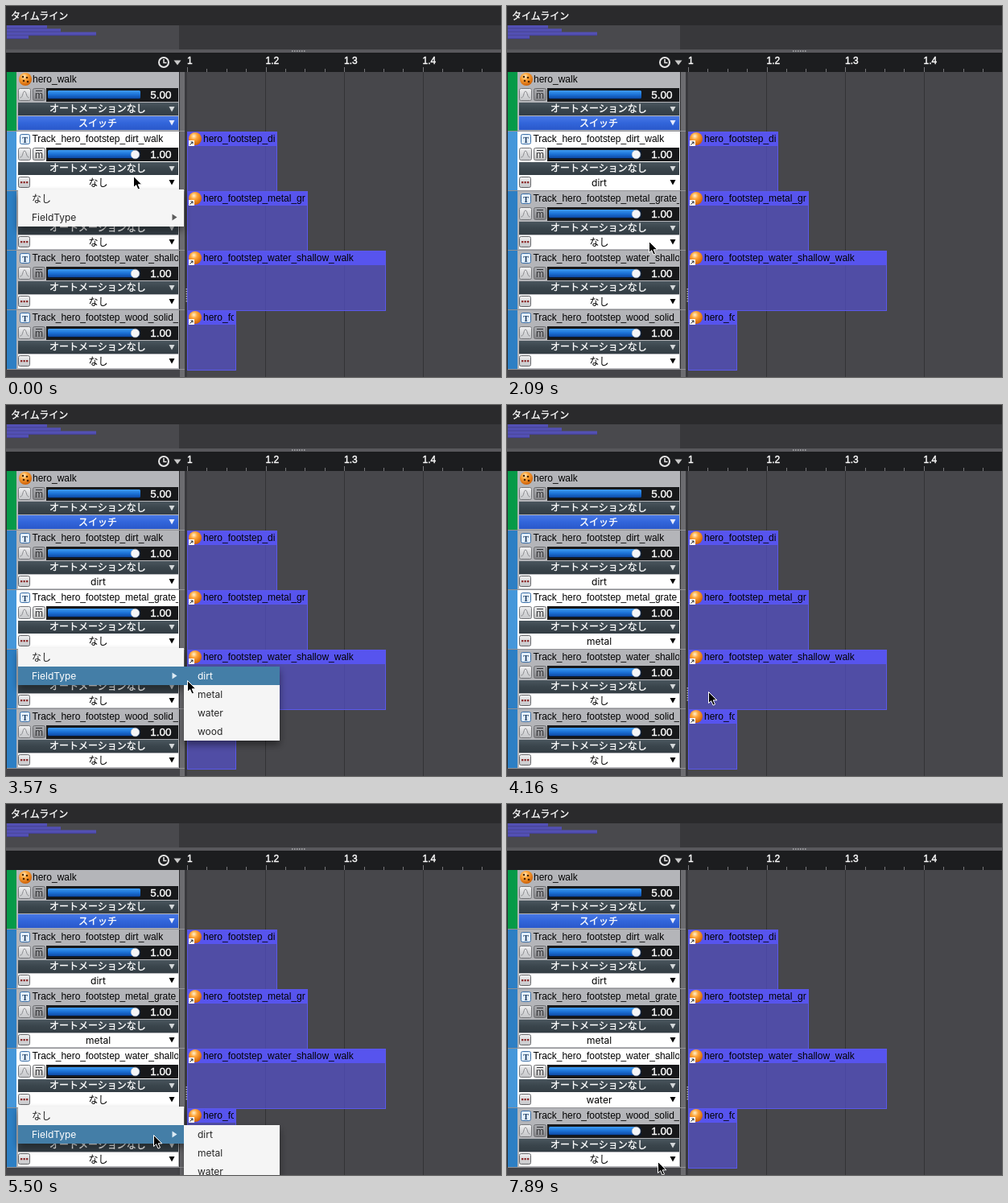
Write an HTML page that moves like this. It is 615 px wide and 461 px high and loops after 8000 ms.

```html
<!DOCTYPE html>
<html lang="ja">
<head>
<meta charset="utf-8">
<title>Timeline</title>
<style>
html, body { margin: 0; width: 100%; height: 100%; overflow: hidden; background: #47474b; }
svg { display: block; width: 100vw; height: 100vh; }
text { font: 12px "Liberation Sans", Arial, sans-serif; white-space: pre; }
.jp { font-family: "Noto Sans CJK JP", "Noto Sans CJK", sans-serif; stroke: #fff; stroke-width: .35px; }
.ui { font-family: Inter, "Noto Sans CJK JP", "Noto Sans CJK", sans-serif; }
.mid { text-anchor: middle; }
.name { letter-spacing: -.03px; }
.num { font-size: 13.5px; text-anchor: end; stroke: #fff; stroke-width: .35px; }
.rule { stroke: #fff; stroke-width: .4px; }
</style>
</head>
<body>
<svg id="stage" viewBox="0 0 615 461" xmlns="http://www.w3.org/2000/svg"></svg>
<script>
const LOOP = 8000, ROW = 74, TOP = 82, ITEM = 23;
const MENU_X = 15, SUB_X = 221, SUB_R = 340;
const KINDS = ["dirt", "metal", "water", "wood"];
const TRACKS = [
  { name: "Track_hero_footstep_dirt_walk", clip: "hero_footstep_dirt_walk", end: 336 },
  { name: "Track_hero_footstep_metal_grate_walk", clip: "hero_footstep_metal_grate_walk", end: 374 },
  { name: "Track_hero_footstep_water_shallow_walk", clip: "hero_footstep_water_shallow_walk", end: 471 },
  { name: "Track_hero_footstep_wood_solid_walk", clip: "hero_footstep_wood_solid_walk", end: 285 }
];
// each menu: when it opens, shows its submenu, and closes
const MENUS = [
  { open: 0, sub: 740, close: 1640 },
  { open: 2240, sub: 3120, close: 4010 },
  { open: 4750, sub: 5500, close: 6690 }
];
// pointer: time, x, y; each place holds until the next
const POINTER = [
  [0, 158, 211], [300, 162, 229], [450, 167, 243], [590, 173, 257], [740, 177, 262],
  [1040, 200, 267], [1190, 227, 267], [1340, 243, 264],
  [1790, 231, 273], [1940, 204, 285], [2090, 176, 292], [2240, 175, 295],
  [2530, 176, 305], [2680, 177, 316], [2830, 178, 327], [2980, 179, 331], [3120, 179, 333],
  [3420, 198, 340], [3570, 225, 342], [3720, 237, 350], [3860, 244, 356], [4010, 249, 359],
  [4160, 250, 356], [4310, 238, 364], [4460, 221, 368], [4600, 199, 367], [4750, 182, 368],
  [5200, 182, 385], [5350, 182, 403], [5500, 183, 411], [5650, 204, 413], [5800, 227, 416],
  [5950, 237, 427], [6100, 241, 438], [6250, 242, 451], [6840, 243, 454],
  [7290, 211, 448], [7440, 180, 441], [7590, 187, 446], [7890, 187, 444]
];

const rect = (x, y, w, h, fill, more = "") =>
  `<rect x="${x}" y="${y}" width="${w}" height="${h}" fill="${fill}" ${more}/>`;
const text = (x, y, s, fill, cls = "", more = "") =>
  `<text x="${x}" y="${y}" fill="${fill}" class="${cls}" ${more}>${s}</text>`;
const path = (d, fill, more = "") => `<path d="${d}" fill="${fill}" ${more}/>`;
const disc = (x, y, r, fill, more = "") => `<circle cx="${x}" cy="${y}" r="${r}" fill="${fill}" ${more}/>`;
const down = (x, y, fill) => path(`M${x - 3.5} ${y - 3}h7l-3.5 6.5z`, fill);
const fade = (id, a, b, c) => `<linearGradient id="${id}" x2="0" y2="1"><stop stop-color="${a}"/>
  <stop offset=".5" stop-color="${b}"/><stop offset="1" stop-color="${c}"/></linearGradient>`;
const box = (id, x, y, w, h) => `<clipPath id="${id}">${rect(x, y, w, h, "#000")}</clipPath>`;

function defs() {
  return `<defs>
    ${fade("bar", "#3f9cf0", "#1c73d8", "#0d49a4")}
    ${fade("btn", "#f2f2f3", "#d8d9db", "#c6c7ca")}
    ${fade("mute", "#0001", "#0002", "#0004")}
    ${fade("drop", "#4a565e", "#3a454c", "#333d44")}
    ${fade("blue", "#4778e6", "#3265da", "#2a58ca")}
    <radialGradient id="ball" cx=".4" cy=".3" r=".75"><stop stop-color="#fff0cc"/>
      <stop offset=".35" stop-color="#ffa63a"/><stop offset="1" stop-color="#c85800"/></radialGradient>
    <filter id="shade" x="-20%" y="-40%" width="140%" height="200%">
      <feDropShadow dx="0" dy="5" stdDeviation="5" flood-color="#000" flood-opacity=".45"/></filter>
    ${box("names", 14, 0, 200, 461)}
    ${TRACKS.map((k, i) => box("clip" + i, 225, 0, k.end - 227, 461)).join("")}
  </defs>`;
}

function header() {
  let s = rect(0, 0, 615, 24, "#2a2a2c") + text(6, 17, "タイムライン", "#fff", "jp");
  s += rect(0, 24, 615, 30, "#38383b") + rect(0, 24, 215, 30, "#49494d");
  [51, 68, 112, 28].forEach((end, i) => {
    const y = 24 + i * 4.2;
    s += rect(1, y, end - 1, 4.2, "#5350b4") + rect(1, y + 3.4, end - 1, .8, "#403d92");
  });
  s += rect(0, 54, 615, 4, "#58585c");
  for (let x = 355; x < 372; x += 3) s += rect(x, 55, 1.5, 2, "#98989b");
  s += rect(0, 58, 615, 24, "#1c1d1f");
  s += disc(196, 70, 6, "none", 'stroke="#e6e6e6" stroke-width="2"');
  s += path("M196 66v4.5h3.5", "none", 'stroke="#e6e6e6" stroke-width="1.5"');
  s += path("M208.5 67.5h9l-4.5 6z", "#c8c8c8");
  for (let i = 0; i <= 15; i++) {
    const h = i % 4 ? 4 : 6;
    s += rect(Math.round(225 + i * 24.4), 82 - h, 1, h, "#77777a");
  }
  ["1", "1.2", "1.3", "1.4"].forEach((v, i) => { s += text(225 + i * 97.5, 72, v, "#fff", "rule"); });
  return s;
}

function clip(k, i) {
  const y = TOP + ROW * (i + 1), w = k.end - 224;
  return rect(225, y, w, ROW + 1, "#5450c8", 'fill-opacity=".72"') +
    rect(225, y, w, 18, "#5754ee") +
    rect(225.5, y + .5, w - 1, ROW, "none", 'stroke="#5b58ea"') +
    disc(235, y + 9, 8, "url(#ball)") +
    rect(227, y + 11, 7, 7, "#fff") +
    path(`M228.5 ${y + 16.5}l3.5 -3.5m-2.5 0h2.5v2.5`, "none", 'stroke="#222"') +
    `<g clip-path="url(#clip${i})">${text(245, y + 13, k.clip, "#000")}</g>`;
}

function area() {
  let s = rect(222, 82, 393, 379, "#47474b");
  for (const x of [322, 420, 518]) s += rect(x, 82, 1, 379, "#333336");
  return s + TRACKS.map(clip).join("");
}

function controls(y, value, end) {
  let s = rect(50, y + 20, 164, 17, "#17181a");
  s += rect(15.5, y + 20.5, 15, 15, "url(#btn)", 'rx="2" stroke="#77787b"');
  s += path(`M17.5 ${y + 32}c4 0 3 -8 5.5 -8s2 8 5.5 8`, "none", 'stroke="#88898c"');
  s += rect(33.5, y + 20.5, 15, 15, "url(#mute)", 'rx="2" stroke="#6c6d70"');
  s += rect(37, y + 23, 8, 1, "#303134") + text(41, y + 33, "m", "#303134", "mid", 'font-weight="bold"');
  s += rect(52, y + 23, 115, 11, "#0b1a30", 'rx="2"');
  s += rect(52, y + 23, end - 52, 10, "url(#bar)", 'rx="1.5"');
  if (end < 167) s += disc(160.5, y + 28.5, 5.3, "#f5f6f8", 'stroke="#a9b4c4" stroke-width=".6"');
  s += text(205.5, y + 33, value, "#fff", "num");
  s += rect(15, y + 38, 199, 16, "url(#drop)");
  return s + text(114, y + 50, "オートメーションなし", "#fff", "jp mid") + down(206, y + 46, "#d4d8da");
}

function rowBase(y, bar, id = "") {
  return rect(0, y, 222, ROW, "#2b2b2e") +
    rect(1, y, 12, ROW - 1, bar, id && `id="bar${id}"`) +
    rect(13, y, 202, ROW - 1, "#b4b5b9", id && `id="body${id}"`);
}

function groupRow() {
  const y = TOP;
  let s = rowBase(y, "#069a48") + disc(24, y + 9, 8, "url(#ball)");
  for (const [x, d] of [[21, 6], [26, 7], [22, 11], [27, 12]]) s += disc(x, y + d, 1.3, "#4a2500");
  return s + text(33, y + 13, "hero_walk", "#000") + controls(y, "5.00", 167) +
    rect(15, y + 55, 199, 17, "url(#blue)") +
    text(114, y + 67.5, "スイッチ", "#fff", "jp mid") + down(206, y + 63, "#e4eaff");
}

function trackRow(k, i) {
  const y = TOP + ROW * (i + 1);
  let s = rowBase(y, "#2d7fc4", "" + i);
  s += rect(17.5, y + 3.5, 12, 12, "#e3effb", 'rx="2" stroke="#3a6ea6"');
  s += text(23.5, y + 13.5, "T", "#16365c", "mid", 'style="font:bold 10px \'Liberation Serif\',serif"');
  s += `<g clip-path="url(#names)">${text(32.4, y + 13, k.name, "#000", "name")}</g>`;
  s += controls(y, "1.00", 160);
  s += rect(15, y + 55, 199, 17, "#fff");
  s += rect(15.5, y + 56.5, 14, 13, "url(#btn)", 'rx="2" stroke="#66676a"');
  for (let n = 0; n < 3; n++) s += rect(18 + n * 3.5, y + 62, 2.3, 2.3, "#8c2c2c");
  return s + text(114.5, y + 67.5, "なし", "#000", "ui mid", `id="val${i}"`) + down(206, y + 63, "#000");
}

function panel() {
  let s = rect(0, 82, 222, 379, "#454549") + groupRow() + TRACKS.map(trackRow).join("");
  s += rect(215, 82, 1, 370, "#2b2b2e") + rect(216, 82, 6, 379, "#6c6c70") + rect(222, 82, 3, 379, "#39393d");
  for (let i = 1; i <= 5; i++) s += rect(1, TOP + ROW * i - 1, 221, 1, "#929296");
  for (let y = 351; y < 369; y += 3) s += rect(223.5, y, 1.5, 1.5, "#b0b0b2");
  return s;
}

function item(x, y, w, label, on) {
  return (on ? rect(x, y, w, ITEM, "#447ea7") : "") +
    text(x + 17, y + 15.8, label, on ? "#fff" : "#262626", "ui");
}

function menu(i, showSub, mx, my) {
  const y = TOP + ROW * (i + 2) - 2, w = SUB_X - MENU_X, subY = y + ITEM;
  const inSub = showSub && mx >= SUB_X;
  const hit = inSub ? 1 : Math.floor((my - y) / ITEM);
  let s = `<g filter="url(#shade)">` + rect(MENU_X, y, w, ITEM * 2, "#f5f5f5");
  if (showSub) s += rect(SUB_X, subY, SUB_R - SUB_X, ITEM * 4, "#f5f5f5");
  s += "</g>" + item(MENU_X, y, w, "なし", hit === 0) + item(MENU_X, subY, w, "FieldType", hit === 1);
  s += path(`M206.5 ${subY + 7.5}l6 4l-6 4z`, hit === 1 ? "#dceaf4" : "#5c5c5c");
  if (showSub) {
    const pick = inSub ? Math.floor((my - subY) / ITEM) : -1;
    KINDS.forEach((k, n) => { s += item(SUB_X, subY + n * ITEM, SUB_R - SUB_X, k, n === pick); });
  }
  return s;
}

const stage = document.getElementById("stage");
stage.innerHTML = defs() + area() + panel() + header() + `<g id="menu"></g>` +
  path("M.5 .5V14.500L3.700 11.600L6 17L8.500 16L6.200 10.800H10.800Z", "#000",
    'id="arrow" stroke="#fff" stroke-width="1" stroke-linejoin="round"');
const el = id => document.getElementById(id);
const menuBox = el("menu"), arrow = el("arrow");
let last = "";

function draw(t) {
  const [at, x, y] = POINTER.filter(p => p[0] <= t).pop();
  const active = MENUS.filter(m => m.open <= t).length - 1;
  const m = MENUS[active], open = t < m.close, sub = t >= m.sub;
  const key = [at, active, open, sub].join();
  if (key === last) return;
  last = key;
  TRACKS.forEach((k, i) => {
    const on = i === active;
    el("bar" + i).setAttribute("fill", on ? "#4597da" : "#2d7fc4");
    el("body" + i).setAttribute("fill", on ? "#fff" : "#b4b5b9");
    el("val" + i).textContent = MENUS[i] && t >= MENUS[i].close ? KINDS[i] : "なし";
  });
  menuBox.innerHTML = open ? menu(active, sub, x, y) : "";
  arrow.setAttribute("transform", `translate(${x} ${y})`);
}

const start = performance.now();
function tick() {
  draw((performance.now() - start) % LOOP);
  requestAnimationFrame(tick);
}
tick();
</script>
</body>
</html>
```
